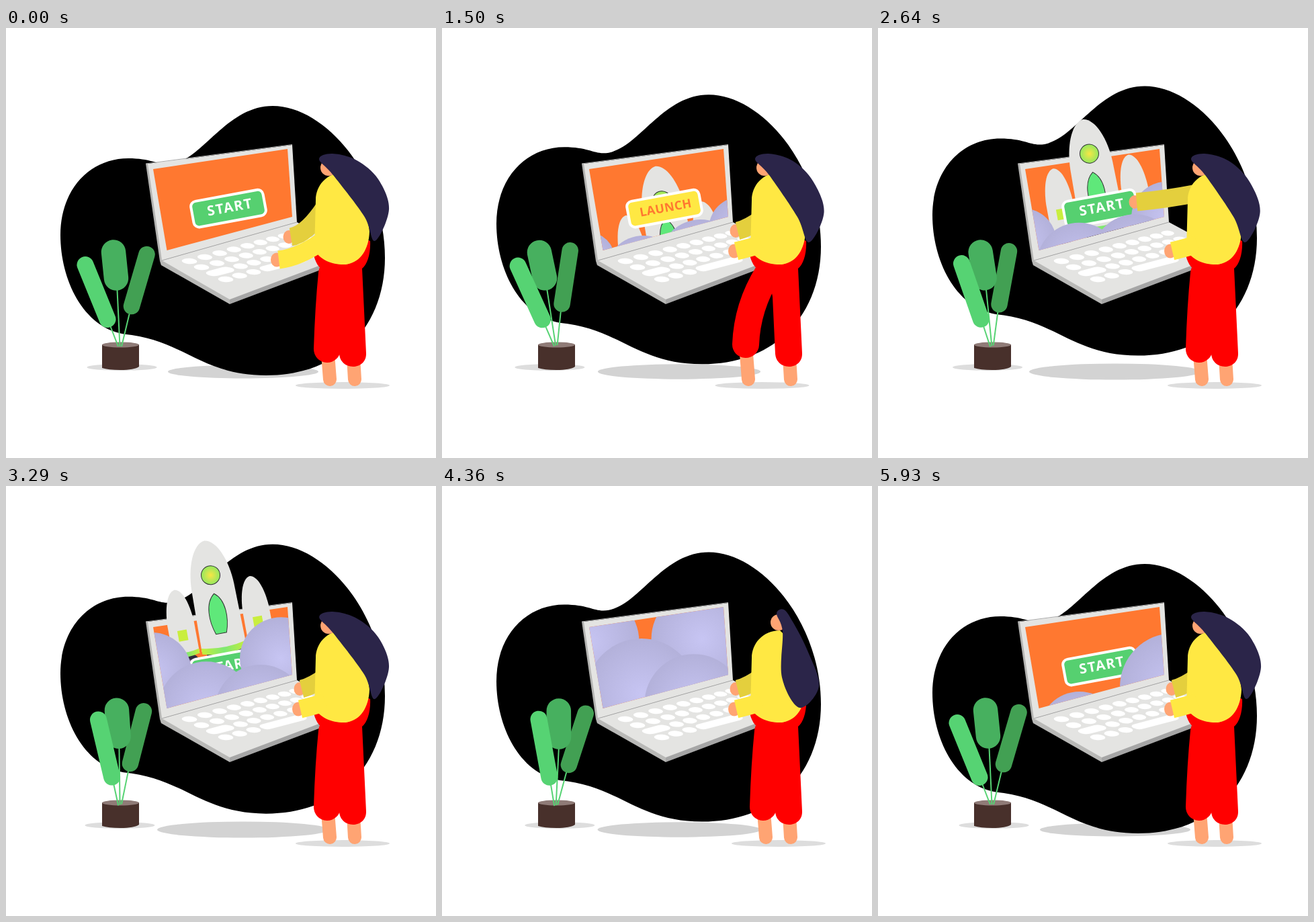
An HTML page that plays this animation: 640 by 640 pixels, repeating every 6000 ms.

```html
<!DOCTYPE html>
<html lang="en">
<head>
<meta charset="utf-8">
<title>Launch</title>
<style>
html, body { margin: 0; width: 100%; height: 100%; overflow: hidden; background: #fff; }
svg { display: block; width: 100vw; height: 100vh; }
text { font-family: "Open Sans", "Noto Sans", sans-serif; font-weight: 700; text-anchor: middle; }
.skin { fill: #ffa473; }
.shirt { fill: #ffe843; }
.red { fill: #f00; }
.metal { fill: #e4e4e2; }
.stem { stroke: #56d373; stroke-width: 2; }
.leaf { stroke-linecap: round; }
.sleeve { fill: none; stroke-width: 27; }
</style>
</head>
<body>
<svg viewBox="0 0 640 640">
  <defs>
    <radialGradient id="puff"><stop offset="0" stop-color="#c7c5f3"/><stop offset="1" stop-color="#b3b1da"/></radialGradient>
    <radialGradient id="glass"><stop offset="0" stop-color="#f8e645"/><stop offset="1" stop-color="#94e85f"/></radialGradient>
    <linearGradient id="band"><stop offset="0" stop-color="#c6ee3c"/><stop offset=".5" stop-color="#7de873"/><stop offset="1" stop-color="#c6ee3c"/></linearGradient>
    <linearGradient id="bulb" x2="0" y2="1"><stop offset="0" stop-color="#74577f"/><stop offset="1" stop-color="#c06a78"/></linearGradient>
    <clipPath id="screen"><path d="M219 210 419 180 426 281 239.500 331Z"/></clipPath>
    <clipPath id="sky"><path d="M239.500 331 426 281 419 180 419 -500 100 -500 219 210Z"/></clipPath>
    <g id="jet">
      <path fill="url(#bulb)" d="M-11 0C-14 12-9 24 0 30C9 24 14 12 11 0Z"/>
      <path fill="#ff7830" d="M0 40 -5 19 -2 24 0 14 2 24 5 19Z"/>
    </g>
    <g id="booster">
      <use href="#jet" transform="translate(0 168) scale(.7)"/>
      <path fill="#2d2b3b" d="M-17.500 172Q-15 164-8 163L8 163Q15 164 17.500 172Q0 168-17.500 172Z"/>
      <path class="metal" d="M0 64C13 66 19 92 20 115V163H-20V115C-19 92-13 66 0 64Z"/>
      <path fill="#c9ee3e" d="M-7 125H7V141H-7Z"/>
      <path fill="url(#band)" d="M-20 156Q0 161 20 156V163Q0 168-20 163Z"/>
    </g>
  </defs>

  <ellipse id="blobShade" cx="353" cy="511.500" fill="#d3d3d3"/>
  <path id="blob" d="M397 116C475 116 564 220 564 342C564 440 500 517 387 517C290 517 265 464 175 455.500C115 445 81 375 81 308C81 240 125 194 182 194C215 194 225 203 240 203C290 203 325 116 397 116Z"/>

  <ellipse id="potShade" cy="505" rx="52" ry="5" fill="#ddd"/>
  <path fill="#48302b" d="M143 471H198V504Q191 509 170 509Q152 509 143 506Z"/>
  <ellipse cx="170.500" cy="471.500" rx="27.500" ry="4" fill="#8f7b77"/>
  <g id="leaves"></g>

  <path fill="#b3b3b1" d="M208 202 212 201 234 345 231 353 229 347Z"/>
  <path fill="#b9b9b7" d="M230 343 334 402 333 411 231 353Z"/>
  <path fill="#a6a6a6" d="M333 402 500 340 500 348 333 411Z"/>
  <path class="metal" d="M232 346 433 289 500 325 500 341 333 404Z"/>
  <path class="metal" d="M211 202 426 174 433 289 232 346Z"/>
  <path fill="none" stroke="#aaa" d="M208 202 426 173.500M232 346 433 289"/>
  <g id="keys" transform="matrix(22 -5.800 18 9 273 347)" stroke="#fff" stroke-linecap="round"></g>
  <path fill="#ff7830" d="M219 210 419 180 426 281 239.500 331Z"/>

  <g clip-path="url(#sky)">
    <g id="dashes" fill="#ffe843">
      <path d="M253 108 258 107 262 127 257 128Z"/>
      <path d="M332 67 337 66 341 82 336 83Z"/>
      <path d="M314 208 319 207 320 213 315 214Z"/>
    </g>
    <g id="rocket">
      <use href="#booster" x="-57"/>
      <use href="#booster" x="57"/>
      <use href="#jet" x="-16.500" y="172"/>
      <use href="#jet" x="17.500" y="172"/>
      <use href="#jet" transform="translate(0 172) scale(.7)"/>
      <path fill="#2d2b3b" d="M-27 166H31V178Q2 186-26 180Z"/>
      <path class="metal" d="M0 0C18 2 31 35 32 70L33.500 162H-33.500L-32 70C-31 35-18 2 0 0Z"/>
      <path fill="url(#band)" d="M-33.500 157Q0 165 33.500 157V166Q0 175-33.500 166Z"/>
      <circle cy="52" r="14" fill="url(#glass)" stroke="#333"/>
      <path fill="#5fe87a" stroke="#333" d="M0 80C-16 92-15 120-8 140H8C15 120 16 92 0 80Z"/>
    </g>
  </g>

  <g transform="translate(331.500 268.500) rotate(-10.500)">
    <rect id="button" x="-55" y="-19.500" width="109" height="39" rx="8" stroke="#fff" stroke-width="4"/>
    <text id="label" y="5.500"></text>
  </g>
  <g id="clouds" clip-path="url(#screen)" fill="url(#puff)"></g>

  <ellipse id="feetShade" cy="532" rx="70" ry="5" fill="#ddd"/>
  <g stroke="#ffa473" stroke-width="20" stroke-linecap="round">
    <path id="foot"/>
    <path d="M517 490 519 523"/>
  </g>
  <path id="leg" fill="none" stroke="#f00" stroke-width="40" stroke-linecap="round"/>
  <path class="red" d="M457 333C460 350 466 358 475 362L493 362Q488 385 492 400L496 485C498 511 537 510 536 484L530 358C538 352 543 335 542 317L500 300Z"/>
  <g id="backArm" stroke="#e4cf3d"><ellipse class="skin" rx="8.500" ry="10" stroke="none"/><path class="sleeve"/></g>
  <path class="shirt" d="M503 215C477 215 461 235 461 256L459 330C467 345 485 352 502 352C525 352 540 332 541 303C538 275 525 235 503 215Z"/>
  <g id="frontArm" stroke="#ffe843"><ellipse class="skin" rx="9" ry="10.500" stroke="none"/><path class="sleeve"/></g>
  <ellipse id="face" class="skin" rx="12" ry="12"/>
  <path id="hair" fill="#2b2549"/>
</svg>

<script>
const $ = id => document.getElementById(id);
const LOOP = 6000, END = 5930; // the last pose holds briefly before the loop

function add(parent, tag, attrs) {
  const el = document.createElementNS("http://www.w3.org/2000/svg", tag);
  return set(parent.appendChild(el), attrs);
}
function set(el, attrs) {
  for (const name in attrs) el.setAttribute(name, attrs[name]);
  return el;
}
const show = (el, on) => set(el, { visibility: on ? "visible" : "hidden" });
const mix = (a, b, k) => Array.isArray(a) ? a.map((v, i) => mix(v, b[i], k)) : a + (b - a) * k;
const linear = k => k;
const square = k => k * k;
const smooth = k => k * k * (3 - 2 * k);

// keys: [time, value] pairs in order
function track(t, keys, ease = smooth) {
  const i = keys.findIndex(key => key[0] > t);
  if (i < 0) return keys[keys.length - 1][1];
  if (!i) return keys[0][1];
  const [t0, a] = keys[i - 1], [t1, b] = keys[i];
  return mix(a, b, ease((t - t0) / (t1 - t0)));
}
const sway = (t, left, right) => track(t, [[0, 0], [END / 3, left], [END * 2 / 3, right], [END, 0]], linear);

// Smooth closed curve through [x, y] points
function curve(points) {
  const n = points.length, at = i => points[(i + n) % n];
  return "M" + at(0) + points.map((b, i) => {
    const a = at(i - 1), c = at(i + 1), e = at(i + 2);
    return `C${b.map((v, j) => v + (c[j] - a[j]) / 6)} ${c.map((v, j) => v - (e[j] - b[j]) / 6)} ${c}`;
  }).join("") + "Z";
}

const leaves = [
  { stem: "184 424 172 474", blade: "209.5 337 187 414", width: 24.5, color: "#42a053", left: -10, right: 2.2 },
  { stem: "165.5 390 169.5 474", blade: "160 333.5 164 372.5", width: 36.5, color: "#47b05f", left: -8, right: 7 },
  { stem: "155 443 167 474", blade: "118 352.5 151 433.5", width: 25, color: "#56d373", left: -3, right: 14.8 }
];
for (const leaf of leaves) {
  leaf.el = add($("leaves"), "g", {});
  add(leaf.el, "path", { d: "M" + leaf.stem, class: "stem" });
  add(leaf.el, "path", { d: "M" + leaf.blade, class: "leaf", stroke: leaf.color, "stroke-width": leaf.width });
}

// Keyboard, in the slanted grid of the laptop base
function key(row, from, to = from) {
  add($("keys"), "path", { d: `M${from} ${row}L${to + .001} ${row}`, "stroke-width": .8 - from * .016 });
}
for (let i = 0; i < 9; i++) {
  const u = i * (1.066 - .021 * i);
  key(0, u);
  key(1, u);
  if (i < 6) key(2, i ? .92 + .9 * i : 0, i ? .92 + .9 * i : .88);
  if (i < 3) key(3, i * .94);
}
key(3, 2.78, 5);

// Clouds as [x, y, radius], back pair first
const clouds = [
  { low: [215, 346, 43], high: [218, 234, 70], end: [125, 240, 60], swell: 1.35 },
  { low: [445, 299, 48], high: [387, 230, 70], end: [440, 299, 80], swell: 1.35 },
  { low: [300, 366, 57], high: [297, 312, 81], end: [300, 366, 60], swell: 1.1 },
  { low: [385, 347, 62], high: [375, 326, 72], end: [400, 420, 60], swell: 1.1 }
];
for (const cloud of clouds) {
  const { low: [x, y, r], high: [hx, hy, hr] } = cloud;
  cloud.el = add($("clouds"), "circle", {});
  cloud.keys = [[1000, [x, y + 60, r]], [1500, cloud.low], [3790, cloud.high], [5000, [hx, hy - 10, hr * cloud.swell]], [END, cloud.end]];
}

// A sleeve bends from the hand to a shoulder
function arm(el, [x, y, shoulderY]) {
  const [hand, sleeve] = el.children;
  set(hand, { cx: x, cy: y });
  set(sleeve, { d: `M${x + 3} ${y}Q${(x + 475) / 2} ${y - 4} 475 ${shoulderY}` });
}
const back = { type: [421, 311, 266], press: [382, 259, 246], rest: [437, 302, 284] };
const front = { type: [403, 345, 314], rest: [435, 332, 322] };

// The head end of the hair follows the head, the long end hangs or blows
const headAhead = { front: [466, 195], crown: [486, 187], neck: [487, 219] };
const headUp = { front: [498, 190], crown: [509, 184], neck: [507, 217] };
const hairBlown = [[522, 197], [554, 225], [570, 270], [549, 317], [533, 280]];
const hairHanging = [[522, 202], [544, 245], [561, 298], [532, 330], [506, 285]];

function rocketTravel(t) {
  if (t < 2900) return track(t, [[1050, -190], [1500, -71], [2100, 0]], linear);
  return 287 * ((t - 2900) / 890) ** 2;
}

function draw(t) {
  const rise = Math.max(0, 1 - Math.abs(t * 2 / END - 1));
  set($("blob"), { transform: `translate(0 ${-33 * rise})` });
  set($("blobShade"), { rx: 112 + 18 * rise, ry: 10 + 2.3 * rise });

  set($("potShade"), { cx: 172.5 + sway(t, -16, 3.5) });
  for (const { el, left, right } of leaves) set(el, { transform: `rotate(${sway(t, left, right)} 157 476)` });

  const s = rocketTravel(t), lift = (t - 3790) * .5;
  set($("rocket"), { transform: `translate(${305 - .18 * s} ${136 - .983 * s}) rotate(-10.5)` });
  set($("dashes"), { transform: `translate(${-.182 * lift} ${-.983 * lift})` });
  show($("rocket"), t > 1050 && t < 4600);
  show($("dashes"), t > 3450 && t < 4700);

  const launch = t >= 700 && t < 2540;
  set($("button"), { fill: launch ? "#ffe843" : "#56d070" });
  set($("label"), launch
    ? { fill: "#ff7830", "font-size": 18, "letter-spacing": .4, x: 1.5 }
    : { fill: "#fff", "font-size": 20.5, "letter-spacing": 1.5, x: 2.2 });
  $("label").textContent = launch ? "LAUNCH" : "START";

  for (const { el, keys } of clouds) {
    const [cx, cy, r] = track(t, keys, square);
    show(set(el, { cx, cy, r }), t > 1000);
  }

  const step = track(t, [[100, 0], [620, 1], [1700, 1], [2200, 0]]);
  const x = 478 - 26 * step, y = 478 - 7 * step;
  set($("leg"), { d: `M485 365Q${x + 2} 415 ${x} ${y}` });
  set($("foot"), { d: `M${x + 1} 485L${x + 4} 523` });
  set($("feetShade"), { cx: 501 - 24.5 * step });

  arm($("backArm"), track(t, [[100, back.type], [680, back.press], [900, back.press], [1350, back.rest], [2100, back.rest], [2540, back.press], [2750, back.press], [3200, back.rest]]));
  arm($("frontArm"), track(t, [[100, front.type], [640, front.rest]]));

  const reach = track(t, [[100, 0], [720, 1], [900, 1], [1400, .17], [2000, .05], [2640, .15], [3200, 0]]);
  const lookUp = track(t, [[3270, 0], [3780, 1], [5250, 1], [5780, 0]]);
  const head = part => mix(headAhead[part], headUp[part], lookUp);
  const length = mix(hairBlown, hairHanging, Math.max(reach, lookUp));
  set($("hair"), { d: curve([head("front"), head("crown"), ...length, head("neck")]) });
  set($("face"), { cx: 480 + 21 * lookUp, cy: 208 - 5 * lookUp });
}

function frame() {
  draw(performance.now() % LOOP);
  requestAnimationFrame(frame);
}
frame();
</script>
</body>
</html>
```
